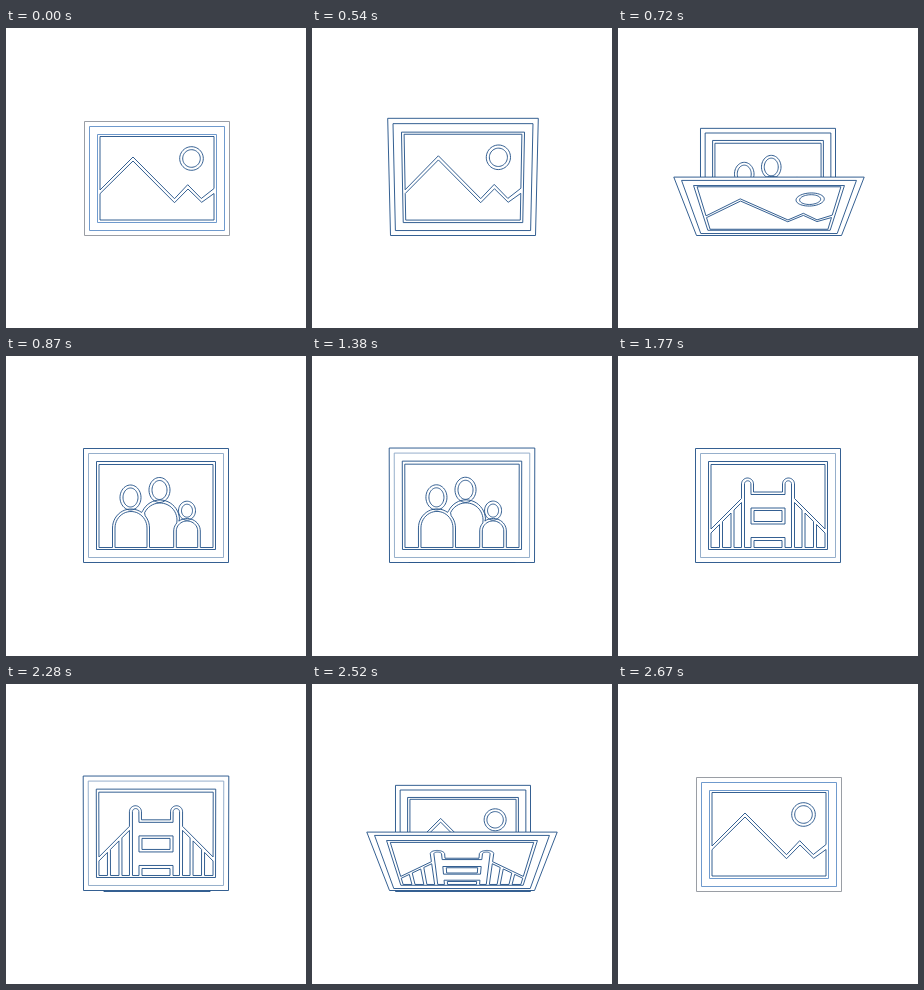
These frames come from a looping animation (300x300 px, 2.7 s). An HTML page with a canvas:

```html
<!DOCTYPE html>
<html lang="en">
<head>
<meta charset="utf-8">
<title>Falling picture frames</title>
<style>
  html, body { margin: 0; width: 100%; height: 100%; overflow: hidden; background: #fff; }
  canvas { display: block; width: 300px; height: 300px; }
</style>
</head>
<body>
<canvas id="stage"></canvas>
<script>
const canvas = document.getElementById('stage');
const ctx = canvas.getContext('2d');
const dpr = window.devicePixelRatio || 1;
canvas.width = canvas.height = 300 * dpr;

const INK = '#1f4e86', PALE = '#8ba6c6', SKY = '#5f8fc8', GREY = '#8f939b';
const LOOP = 2700, TURN = 900, START = 450, MOVE = 420, STEP = 30;
const CX = 150, BASE = 206.5, DEPTH = 440;
const L = 93, R = 207, T = 108.5, B = 191.5;

// Every shape is a closed list of [x, y] points.
const box = (x0, y0, x1, y1) => [[x0, y0], [x1, y0], [x1, y1], [x0, y1]];

function arc(cx, cy, rx, ry, from, to) {
  const n = Math.ceil(Math.abs(to - from) / 8);
  return Array.from({ length: n + 1 }, (_, i) => {
    const a = (from + (to - from) * i / n) * Math.PI / 180;
    return [cx + rx * Math.cos(a), cy + ry * Math.sin(a)];
  });
}

const ring = (cx, cy, rx, ry, w) =>
  [arc(cx, cy, rx, ry, 0, 360), arc(cx, cy, rx - w, ry - w, 0, 360)];

function landscape() {
  return [
    [[L, T - 1], [R, T - 1], [R, 159.5], [194.3, 169.5], [180.7, 155.7], [167.5, 169.7], [126, 128], [L, 161]],
    [[L, 164.7], [126, 132], [167.5, 173.7], [181, 160], [194.7, 173.3], [R, 164.5], [R, B - .5], [L, B - .5]],
    ...ring(184.5, 129.5, 11.8, 11.8, 3)
  ];
}

function family() {
  const left = (a, b) => arc(125, 172, 18.5, 19, a, b);
  const right = (a, b) => arc(181, 175, 13.3, 12.5, a, b);
  const inside = (x, y, rx, ry) => [[x - rx, B], ...arc(x, y, rx, ry, -180, 0), [x + rx, B]];
  return [
    [[L, T], [R, T], [R, B], [194.3, B], ...right(0, -128),
      ...arc(154, 164, 19.5, 20, -3, -152), ...left(-55, -180), [106.5, B], [L, B]],
    [[143.5, B], ...left(0, -40), ...arc(154, 164, 17, 17, -155, 0), ...right(-140, -180), [167.7, B]],
    inside(125, 172, 16, 16.5),
    inside(181, 175, 10.7, 10),
    ...ring(124.5, 141.5, 10.5, 12.5, 3),
    ...ring(153.5, 134, 10.5, 12.5, 3),
    ...ring(181, 154.7, 8.5, 9.5, 3)
  ];
}

function bridge() {
  const mirror = shape => shape.map(([x, y]) => [300 - x, y]);
  const cell = (a, b) => [[a, B], [a, 270 - a], [b, 270 - b], [b, B]];
  const cells = [cell(L, 101.5), cell(104.5, 113), cell(116, 123.5)];
  const dome = (x, r, dir) => arc(x, 128, r, r, dir > 0 ? -180 : 0, dir > 0 ? 0 : -180);
  return [
    [[L, T], [R, T], [R, 173], [176.5, 142.5], ...dome(170.5, 6, -1), [164.5, 136],
      [135.5, 136], ...dome(129.5, 6, -1), [123.5, 142.5], [L, 173]],
    [[126.5, B], ...dome(129.7, 3.2, 1), [133, 138.5], [167, 138.5], ...dome(170.3, 3.2, 1),
      [173.5, B], [167, B], [167, 181.5], [133, 181.5], [133, B]],
    box(133, 152, 167, 168),
    box(136, 154.5, 164, 165.5),
    box(136, 184.5, 164, B),
    ...cells, ...cells.map(mirror)
  ];
}

const borders = [
  box(77.5, 92.5, 222.5, BASE),
  box(82.5, 97.5, 217.5, 201.5),
  box(90.5, 105.5, 209.5, 193.5)
];
const pictures = [
  { shapes: landscape(), shift: 1, tints: [GREY, SKY, SKY] },
  { shapes: family(), shift: 0, tints: [INK, PALE, INK] },
  { shapes: bridge(), shift: 0, tints: [INK, PALE, INK] }
];

function trace(shape, place, shift, color, fill) {
  ctx.beginPath();
  for (const [x, y] of shape) {
    const [px, py] = place(x - CX, BASE - y);
    ctx.lineTo(CX + px + shift, BASE - py + shift);
  }
  ctx.closePath();
  if (fill) ctx.fill();
  ctx.strokeStyle = color;
  ctx.stroke();
}

function drawPicture({ shapes, shift, tints }, place, resting) {
  borders.forEach((b, i) => trace(b, place, shift, resting ? tints[i] : INK, i === 0));
  shapes.forEach(s => trace(s, place, shift, INK));
}

const grown = s => (x, h) => [x * s, h * s];

// Tips forward around the bottom edge, in perspective.
function tipped(angle) {
  const sin = Math.sin(angle), cos = Math.cos(angle);
  return (x, h) => {
    const s = DEPTH / (DEPTH - h * sin);
    return [x * s, h * cos * s];
  };
}

const ease = p => p < .5 ? 2 * p * p : 1 - 2 * (1 - p) ** 2;

function draw(time) {
  const t = Math.floor(time % LOOP / STEP) * STEP;
  const turn = Math.floor(t / TURN);
  const p = Math.min(1, Math.max(0, (t % TURN - START) / MOVE));
  const e = ease(p);

  ctx.setTransform(dpr, 0, 0, dpr, 0, 0);
  ctx.fillStyle = '#fff';
  ctx.fillRect(0, 0, 300, 300);
  ctx.lineWidth = .9;
  ctx.lineJoin = 'round';

  if (p > 0) drawPicture(pictures[(turn + 1) % 3], grown(.73 + .27 * e), p === 1);
  if (p < 1) drawPicture(pictures[turn], tipped(e * Math.PI / 2), e < .02);
}

function tick() {
  draw(performance.now());
  requestAnimationFrame(tick);
}
tick();
</script>
</body>
</html>
```
